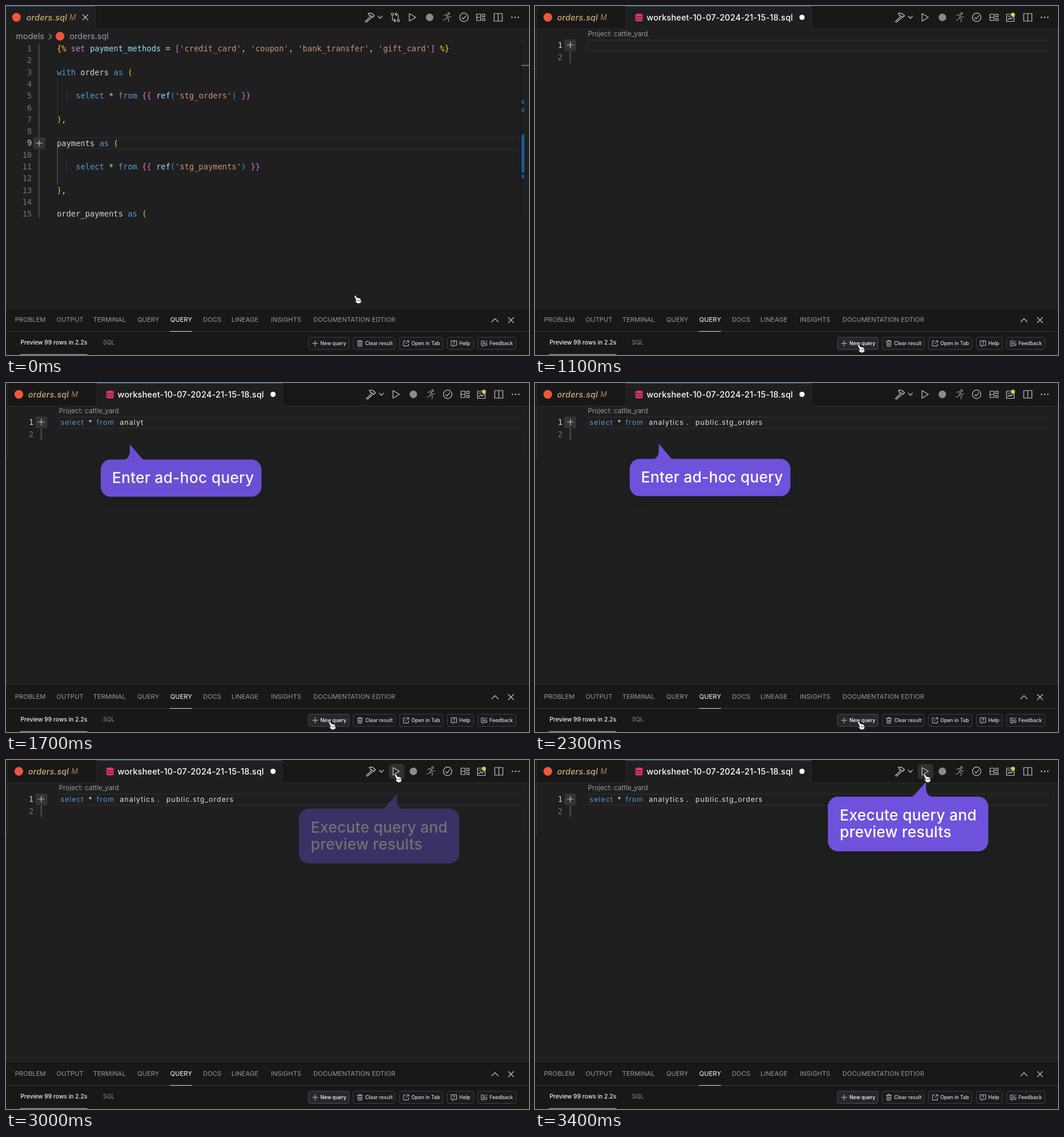
Recreate the animation shown at these times as an HTML page. Size 900 px wide and 600 px high, loop 4.1 s.

```html
<!DOCTYPE html>
<html lang="en">
<head>
<meta charset="utf-8">
<title>Ad-hoc query</title>
<style>
  html, body { margin: 0; width: 100%; height: 100%; overflow: hidden; background: #1f1f1f; }
  svg { display: block; width: 900px; height: 600px; }
  text { font-family: Inter, "Open Sans", sans-serif; white-space: pre; fill: #d4d4d4; }
  .code text, .mono { font-family: "DejaVu Sans Mono", "Liberation Mono", monospace; font-size: 13.53px; }
  .num { fill: #6e7681; text-anchor: end; }
  .now { fill: #ccc; }
  .gold { fill: #f5d327; } .pink { fill: #d670d2; } .blue { fill: #569cd6; }
  .sky { fill: #9cdcfe; } .str { fill: #ce9178; } .set { fill: #c586c0; } .paren { fill: #179fff; }
  .title { font-size: 14.2px; font-weight: 500; letter-spacing: .2px; }
  .open { fill: #fff; }
  .modified { font-style: italic; fill: #d0ab74; }
  .crumb { font-size: 14.2px; fill: #a0a0a0; }
  .project { font-size: 11.5px; fill: #999; }
  .tabs text { font-size: 11px; fill: #9a9a9a; letter-spacing: .05px; }
  .tabs .on { fill: #fff; }
  .small { font-size: 10.1px; font-weight: 500; fill: #f2f2f2; }
  .idle { font-weight: 400; fill: #8e8e8e; }
  .button text { font-size: 8.6px; font-weight: 500; fill: #dcdcdc; }
  .button rect { fill: #1a1b1e; stroke: #3b3f47; }
  .button path { stroke-width: 1; }
  .button.hover rect { fill: #25272c; stroke: #474b53; }
  .button.hover text { fill: #fff; }
  .line { fill: none; stroke: #c5c5c5; stroke-width: 1.2; stroke-linecap: round; stroke-linejoin: round; }
  .muted { stroke: #999; }
  .typed { font-size: 12px; letter-spacing: 1.1px; fill: #e6e6e6; }
  .bubble path, .bubble rect { fill: #6e52dc; }
  .bubble { filter: drop-shadow(0 9px 8px rgba(0, 0, 0, .07)); }
  .bubble text { font-size: 26px; font-weight: 500; letter-spacing: .2px; fill: #fff; }
</style>
</head>
<body>
<svg viewBox="0 0 900 600">
  <defs>
    <path id="hammer" class="line" d="M-8 7.5L1-1.5M-6 8.5L3 .5M-3-6.5Q2-9 6-4.5L8-3 5 0 3-2-1-3Q0-5-3-6.5z"/>
    <path id="down" class="line" d="M-3.5-2L0 1.8 3.5-2"/>
    <g id="compare" class="line">
      <circle cx="-5" cy="-5.5" r="2"/><circle cx="5" cy="5.5" r="2"/>
      <path d="M-5-3V3Q-5 5.5-2 5.5H0M-2 3L.5 5.5-2 8M5 3V-3Q5-5.5 2-5.5H0M2-8L-.5-5.5 2-3"/>
    </g>
    <path id="play" class="line" d="M-5-6.5L6 0-5 6.5z"/>
    <circle id="mark" r="6.5" fill="#8b8b8b"/>
    <g id="runner" class="line muted">
      <circle cx="3" cy="-6.5" r="1.6"/>
      <path d="M-5-3L-2-5 1-3-1 1 3 3 2 8M-1 1L-3 4-7 4.5M1-3L3 0 7-1"/>
    </g>
    <g id="check" class="line"><circle r="7.3"/><path d="M-3.3.3L-1 2.8 3.6-2.6"/></g>
    <path id="layout" class="line" d="M-7-5.5H0V5.5H-7zM-7 0H0M3-5.5H7V-1H3zM3 2H7V5.5H3z"/>
    <path id="split" class="line" d="M-7-6.5H7V6.5H-7zM0-6.5V6.5"/>
    <g id="dots" fill="#c5c5c5"><circle cx="-5.5" r="1.2"/><circle r="1.2"/><circle cx="5.5" r="1.2"/></g>
    <g id="note">
      <path class="line" d="M-6.5-5.5H6.5V7H-6.5zM-4-2H0M-4 4L-1 1 1 3 4 0"/>
      <circle cx="4.5" cy="-4.5" r="3.4" fill="#e5c35b"/>
    </g>
    <path id="close" class="line" d="M-4.5-4.5L4.5 4.5M4.5-4.5L-4.5 4.5"/>
    <path id="plus" class="line" d="M-5 0H5M0-5V5"/>
  </defs>

  <rect width="900" height="600" fill="#1f1f1f"/>

  <g id="models">
    <path fill="#181818" d="M153 0H900V39H153z"/>
    <path fill="none" stroke="#2b2b2b" d="M153.5 0V39.5H900"/>
    <path fill="#19609f" d="M0 0H153V1H0z"/>
    <circle cx="18" cy="19.5" r="7.5" fill="#f0563d"/>
    <text class="title modified" x="35" y="24.5">orders.sql</text>
    <text class="modified" x="109" y="24" font-size="12.5" opacity=".75">M</text>
    <use href="#close" x="136.5" y="19.5"/>
    <g class="toolbar" data-icons="hammer 626,down 644,compare 670,play 699,mark 729,runner 759,check 788,layout 817,split 847,dots 876"></g>
    <text class="crumb" x="17" y="57">models</text>
    <path class="line" stroke-opacity=".7" d="M74 48L78.5 52.5 74 57"/>
    <circle cx="93" cy="52" r="7.5" fill="#f0563d"/>
    <text class="crumb" x="109.5" y="57">orders.sql</text>

    <path fill="#3a3a3c" d="M55.5 64H58.5V364H55.5z"/>
    <path fill="none" stroke="#2c2c2c" d="M87 226.5H886M87 245.5H886"/>
    <path fill="none" stroke="#383838" d="M88.5 124V185M104.5 144V165M104.5 266V287"/>
    <path fill="none" stroke="#656565" d="M88.5 246V307"/>
    <rect x="47" y="226" width="20.5" height="20" rx="3" fill="#343437"/>
    <use href="#plus" x="57" y="236"/>
    <path fill="none" stroke="#111" d="M886.5 64V364"/>
    <path fill="#858585" d="M887 101.5H900V103H887z"/>
    <path fill="#195088" d="M887 162h5v6h-5zM887 176h5v6h-5zM887 290h5v6h-5z"/>
    <path fill="#1a5a96" d="M887 221h5v65h-5z"/>
    <g id="numbers" class="code"></g>
    <g class="code">
      <text x="87.4" y="78"><tspan class="gold">{%</tspan> <tspan class="set">set</tspan> <tspan class="sky">payment_methods</tspan> = <tspan class="pink">[</tspan><tspan class="str">'credit_card'</tspan>, <tspan class="str">'coupon'</tspan>, <tspan class="str">'bank_transfer'</tspan>, <tspan class="str">'gift_card'</tspan><tspan class="pink">]</tspan> <tspan class="gold">%}</tspan></text>
      <text x="87.4" y="118.6"><tspan class="blue">with</tspan> orders <tspan class="blue">as</tspan> <tspan class="gold">(</tspan></text>
      <text x="120" y="159.2"><tspan class="blue">select</tspan> * <tspan class="blue">from</tspan> <tspan class="pink">{{</tspan> <tspan class="sky">ref</tspan><tspan class="paren">(</tspan><tspan class="str">'stg_orders'</tspan><tspan class="paren">)</tspan> <tspan class="pink">}}</tspan></text>
      <text x="87.4" y="199.8"><tspan class="gold">)</tspan>,</text>
      <text x="87.4" y="240.6">payments <tspan class="blue">as</tspan> <tspan class="gold">(</tspan></text>
      <text x="120" y="281.2"><tspan class="blue">select</tspan> * <tspan class="blue">from</tspan> <tspan class="pink">{{</tspan> <tspan class="sky">ref</tspan><tspan class="paren">(</tspan><tspan class="str">'stg_payments'</tspan><tspan class="paren">)</tspan> <tspan class="pink">}}</tspan></text>
      <text x="87.4" y="321.8"><tspan class="gold">)</tspan>,</text>
      <text x="87.4" y="362.2">order_payments <tspan class="blue">as</tspan> <tspan class="gold">(</tspan></text>
    </g>
  </g>

  <g id="adhoc">
    <path fill="#181818" d="M0 0H156V39H0zM475 0H900V39H475z"/>
    <path fill="none" stroke="#2b2b2b" d="M2.5 0V130M3 39.5H156.5V0M475.5 0V39.5H900"/>
    <path fill="none" stroke="#191919" d="M886.5 41V130"/>
    <path fill="#19609f" d="M156 0H475V1H156z"/>
    <circle cx="22" cy="19.5" r="7.5" fill="#f0563d"/>
    <text class="title modified" x="38" y="24.5">orders.sql</text>
    <text class="modified" x="112.5" y="24" font-size="12.5" opacity=".75">M</text>
    <path fill="#e8336d" d="M172.5 15.5Q172.5 13 179 13T185.5 15.5V24Q185.5 26.5 179 26.5T172.5 24z"/>
    <path fill="none" stroke="#1f1f1f" d="M172.5 17.5Q179 20 185.5 17.5M172.5 21.7Q179 24.2 185.5 21.7"/>
    <text class="title open" x="192" y="25">worksheet-10-07-2024-21-15-18.sql</text>
    <circle cx="459.5" cy="19.5" r="4.5" fill="#fff"/>
    <rect id="playHover" x="659" y="7" width="26.5" height="26" rx="5" fill="#2f3032"/>
    <g class="toolbar" data-icons="hammer 628,down 646,play 671,mark 701,runner 731,check 760,layout 790,note 818,split 848,dots 877"></g>
    <text class="project" x="91" y="52">Project: cattle_yard</text>
    <path fill="none" stroke="#2e2e2e" d="M887 58.5H91.5V77.5H887"/>
    <path fill="#444" d="M59.3 78H62V98H59.3z"/>
    <rect x="50.5" y="57.5" width="20.5" height="20" rx="3" fill="#343437"/>
    <use href="#plus" x="60.7" y="67"/>
    <text class="mono num now" x="47.5" y="72">1</text>
    <text class="mono num" x="47.5" y="92.5">2</text>
    <g id="query"></g>
  </g>

  <rect y="520" width="900" height="80" fill="#181818"/>
  <path fill="none" stroke="#393939" d="M0 559.5H900"/>
  <path fill="none" stroke="#dcdcdc" d="M282 559.5H320"/>
  <path fill="none" stroke="#8a8a8a" stroke-width="1.5" d="M24 599.2H140"/>
  <g class="tabs">
    <text x="15.5" y="543">PROBLEM</text><text x="87" y="543">OUTPUT</text>
    <text x="150" y="543">TERMINAL</text><text x="226" y="543">QUERY</text>
    <text x="282.5" y="543" class="on">QUERY</text><text x="339" y="543">DOCS</text>
    <text x="388" y="543">LINEAGE</text><text x="456" y="543">INSIGHTS</text>
    <text x="529" y="543">DOCUMENTATION EDTIOR</text>
  </g>
  <path class="line" d="M836 543L841.5 537.5 847 543"/>
  <use href="#close" x="869" y="540"/>
  <text class="small" x="25" y="582">Preview 99 rows in 2.2s</text>
  <text class="small idle" x="167" y="582">SQL</text>
  <g id="buttons"></g>

  <g id="enterTip" class="bubble">
    <rect x="163" y="130.5" width="276.5" height="64" rx="17"/>
    <path d="M213 104.5L234 129Q236 131 240 132H200Q213 130 213 116z"/>
    <text x="182.5" y="170.5">Enter ad-hoc query</text>
  </g>
  <g id="runTip" class="bubble">
    <rect x="504" y="63" width="276" height="94" rx="17"/>
    <path d="M673 37.5L652 61Q650 63 646 64H686Q673 62 673 49z"/>
    <text x="524.5" y="104">Execute query and</text>
    <text x="524.5" y="133">preview results</text>
  </g>

  <g id="cursor">
    <path fill="#fff" stroke="#111" stroke-width=".9" stroke-linejoin="round" d="M-5.6-6.4q1.6-1 2.6.9l1.6 3.2q1.2-.9 2 .3 1.3-.8 2 .4 1.4-.6 2.1.8l1.1 3.4q.5 2-.6 3.8l-4.6 1.6q-2.6-.9-5.2-3.8-1-1.6.8-1.6l1.3.5-3.3-6.8q-.6-1.2.2-1.7z"/>
    <path fill="none" stroke="#222" stroke-width=".7" d="M-.5 1L.6 4M1.7.8L2.8 3.8M3.8.8L4.6 3.2"/>
  </g>
</svg>
<script>
const LOOP = 4100, TICK = 100;
const $ = id => document.getElementById(id);

const clamp = v => Math.min(1, Math.max(0, v));
const linear = (t, from, to) => clamp((t - from) / (to - from));
const easeOut = (t, from, to) => 1 - (1 - linear(t, from, to)) ** 2;
const mix = (a, b, p) => a + (b - a) * p;

// Static parts
for (const bar of document.querySelectorAll('.toolbar')) {
  bar.innerHTML = bar.dataset.icons.split(',').map(item => {
    const [name, x] = item.split(' ');
    return `<use href="#${name}" x="${x}" y="19.5"/>`;
  }).join('');
}

$('numbers').innerHTML = Array.from({ length: 15 }, (_, i) =>
  `<text class="num ${i === 8 ? 'now' : ''}" x="44.5" y="${78 + i * 20.3}">${i + 1}</text>`).join('');

const buttons = [
  ['New query', 520, 71, 'M-4.5 0H4.5M0-4.5V4.5'],
  ['Clear result', 597, 73, 'M-4.5-3.5H4.5M-1.5-3.5V-5H1.5V-3.5M-3.5-3.5L-3 5H3L3.5-3.5M-1-1V3M1-1V3'],
  ['Open in Tab', 676.5, 76, 'M-1-4H-4.5V4.5H4V1M1.5-4.5H4.5V-1.5M4.5-4.5L-.5.5'],
  ['Help', 759, 46, 'M-4.5-4.5H4.5V3.5H0L-2.5 5.5V3.5H-4.5zM-1.5-2Q0-4 1.5-2 1.5-1 0 0M0 1.5V1.7'],
  ['Feedback', 811, 67, 'M1-4H-5V3.5H-3V5.5L-.5 3.5H4.5V0M-2.5-1H0M-2.5 1H2M1 0L5-4.5']
];
$('buttons').innerHTML = buttons.map(([label, x, width, icon]) => `
  <g class="button">
    <rect x="${x + .5}" y="569.5" width="${width - 1}" height="21" rx="3"/>
    <path class="line" transform="translate(${x + 12} 580)" d="${icon}"/>
    <text x="${x + 21}" y="583.3">${label}</text>
  </g>`).join('');
const newQuery = $('buttons').firstElementChild;

// Typed words: text, x, colour class, index of the first character
const words = [
  ['select', 94, 'blue', 0], ['*', 142, '', 7], ['from', 156, 'blue', 9],
  ['analytics', 196, '', 14], ['.', 260.5, '', 23], ['public.stg_orders', 276, '', 26]
];
$('query').innerHTML = words.map(([, x, colour]) =>
  `<text class="typed" x="${x}" y="72.3"><tspan class="${colour}"></tspan></text>`).join('');
const slots = $('query').querySelectorAll('tspan');

function typedCount(t) {
  if (t < 1400) return Math.round(8 * linear(t, 1200, 1400));
  if (t < 2100) return Math.round(mix(8, 37, linear(t, 1400, 2100)));
  return Math.round(mix(37, 43, linear(t, 2100, 2300)));
}

function place(node, x, y, opacity = 1) {
  node.setAttribute('transform', `translate(${x} ${y})`);
  node.style.opacity = opacity;
}

function render(t) {
  $('models').style.opacity = 1 - linear(t, 700, 900);
  $('adhoc').style.opacity = linear(t, 820, 1100);

  const count = typedCount(t);
  words.forEach(([word, , , start], i) => {
    slots[i].textContent = word.slice(0, Math.max(0, count - start));
  });

  const enter = easeOut(t, 1297, 1800);
  const leave = easeOut(t, 2400, 2762);
  place($('enterTip'), 0, 26 * (1 - enter), enter * (1 - leave));

  const run = easeOut(t, 2897, 3400);
  place($('runTip'), 0, 33 * (1 - run), run);

  const toButton = easeOut(t, 300, 700);
  const toPlay = easeOut(t, 2400, 2851);
  place($('cursor'),
    mix(mix(605.5, 561.5, toButton), 675, toPlay),
    mix(mix(504, 588.5, toButton), 31, toPlay));

  newQuery.classList.toggle('hover', t >= 600);
  $('playHover').style.opacity = t >= 2800 ? 1 : 0;
}

const begin = performance.now();
function frame() {
  const t = (performance.now() - begin) % LOOP;
  render(Math.floor(t / TICK) * TICK);
  requestAnimationFrame(frame);
}
frame();
</script>
</body>
</html>
```
